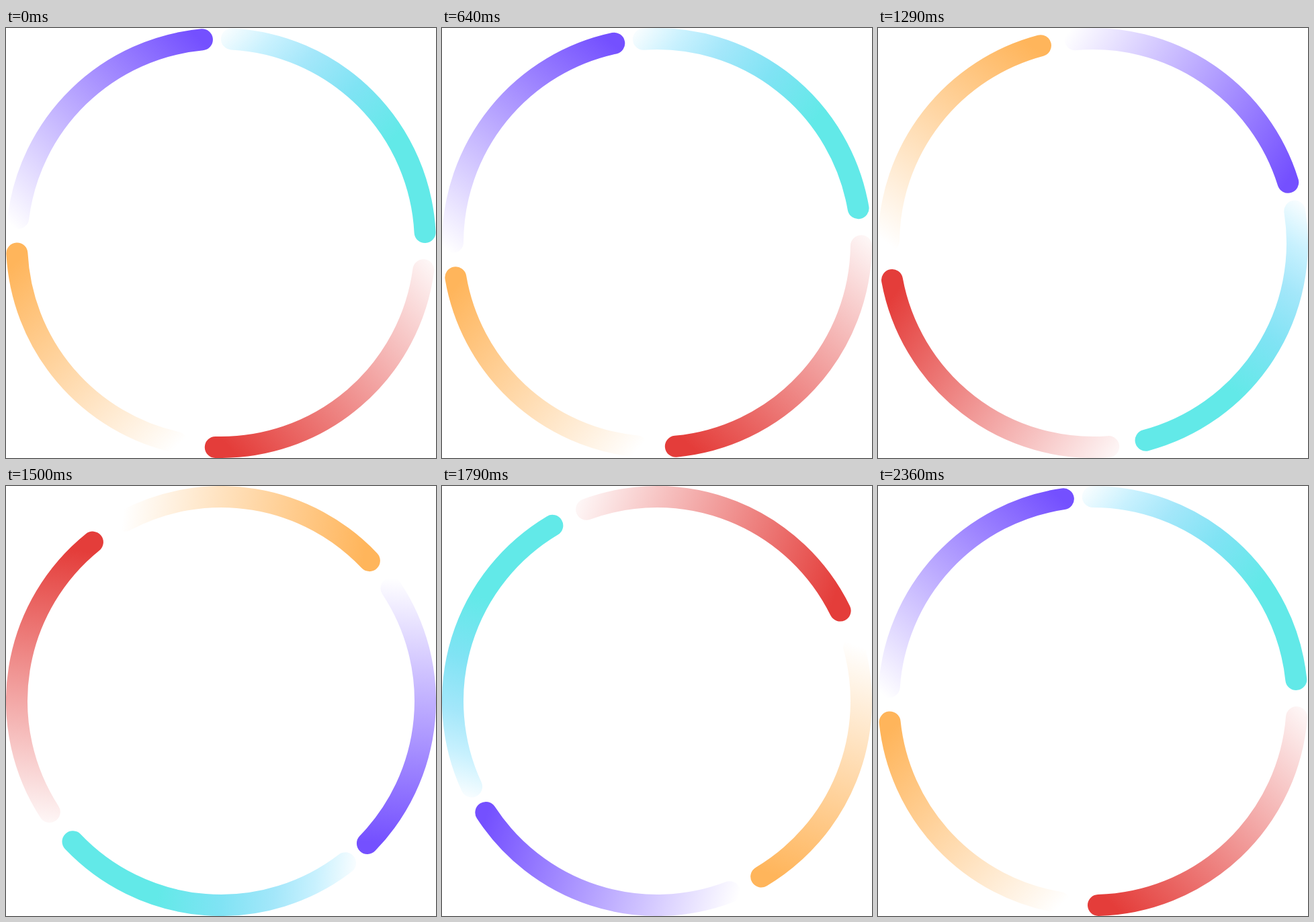
Recreate the animation shown at these times as an HTML page. Size 640x640 px, loop 2.43 s.

```html
<!DOCTYPE html>
<html lang="en">
<head>
<meta charset="utf-8">
<title>Ring spinner</title>
<style>
  html, body { margin: 0; width: 100%; height: 100%; overflow: hidden; background: #fff; }
  svg { display: block; width: 100%; height: 100%; }
  path { fill: none; stroke-width: 32; stroke-linecap: round; }
</style>
</head>
<body>
<svg viewBox="0 0 640 640">
  <defs>
    <linearGradient id="cyan" gradientUnits="userSpaceOnUse" x1="165" y1="165" x2="371" y2="371">
      <stop offset="0" stop-color="#f8fdff"/>
      <stop offset=".2" stop-color="#c8f1fe"/>
      <stop offset=".4" stop-color="#a4e7fa"/>
      <stop offset=".67" stop-color="#80e3f4"/>
      <stop offset="1" stop-color="#62e9e8"/>
    </linearGradient>
    <linearGradient id="red" gradientUnits="userSpaceOnUse" x1="637" y1="345" x2="330" y2="622">
      <stop offset="0" stop-color="#e43d3a" stop-opacity=".03"/>
      <stop offset="1" stop-color="#e43d3a"/>
    </linearGradient>
    <linearGradient id="orange" gradientUnits="userSpaceOnUse" x1="264" y1="614" x2="18" y2="345">
      <stop offset="0" stop-color="#ffb55b" stop-opacity="0"/>
      <stop offset="1" stop-color="#ffb55b"/>
    </linearGradient>
    <linearGradient id="purple" gradientUnits="userSpaceOnUse" x1="16" y1="302" x2="292" y2="20">
      <stop offset="0" stop-color="#7450ff" stop-opacity="0"/>
      <stop offset="1" stop-color="#7450ff"/>
    </linearGradient>
  </defs>
  <g id="ring"></g>
</svg>
<script>
const LOOP = 2430, FPS = 14, STEPS = 34;
const CENTER = 320, RADIUS = 304;
const ring = document.getElementById('ring');

// Tail and head of each arc, in degrees clockwise from the top.
const arcs = { cyan: [3, 87], red: [97.6, 181.55], orange: [192.5, 267.1], purple: [277, 354.7] };

// Ring angle at a few steps: a short wind-up, then one full turn.
const keys = [[0, 0], [4.5, -10], [9, -6.8], [14, 20.25], [21, 139.5],
              [25, 242.2], [29, 320.3], [33, 356.95], [34, 360]];

const slope = i => (keys[i + 1][1] - keys[i][1]) / (keys[i + 1][0] - keys[i][0]);

function tangent(i) {
  const last = keys.length - 1;
  if (i === 0) return 2 * slope(0) - tangent(1);
  if (i === last) return 2 * slope(last - 1) - tangent(last - 1);
  const before = keys[i][0] - keys[i - 1][0];
  const after = keys[i + 1][0] - keys[i][0];
  return (before * slope(i) + after * slope(i - 1)) / (before + after);
}

function angleAt(step) {
  let i = 0;
  while (i < keys.length - 2 && step >= keys[i + 1][0]) i++;
  const [x0, y0] = keys[i], [x1, y1] = keys[i + 1];
  const h = x1 - x0, u = (step - x0) / h, v = 1 - u;
  return y0 * v * v * (1 + 2 * u) + y1 * u * u * (3 - 2 * u)
       + h * u * v * (tangent(i) * v - tangent(i + 1) * u);
}

function point(deg) {
  const a = deg * Math.PI / 180;
  return `${CENTER + RADIUS * Math.sin(a)} ${CENTER - RADIUS * Math.cos(a)}`;
}

for (const [name, [tail, head]] of Object.entries(arcs)) {
  const path = document.createElementNS('http://www.w3.org/2000/svg', 'path');
  path.setAttribute('d', `M${point(tail)}A${RADIUS} ${RADIUS} 0 0 1 ${point(head)}`);
  path.setAttribute('stroke', `url(#${name})`);
  ring.append(path);
}

function draw(ms) {
  // Motion is held for each step; the small offset absorbs 10 ms rounding.
  const step = Math.min(STEPS - 1, Math.floor(ms * FPS / 1000 + 0.08));
  ring.setAttribute('transform', `rotate(${angleAt(step)} ${CENTER} ${CENTER})`);
}

const start = performance.now();
function tick() {
  draw((performance.now() - start) % LOOP);
  requestAnimationFrame(tick);
}
tick();
</script>
</body>
</html>
```
